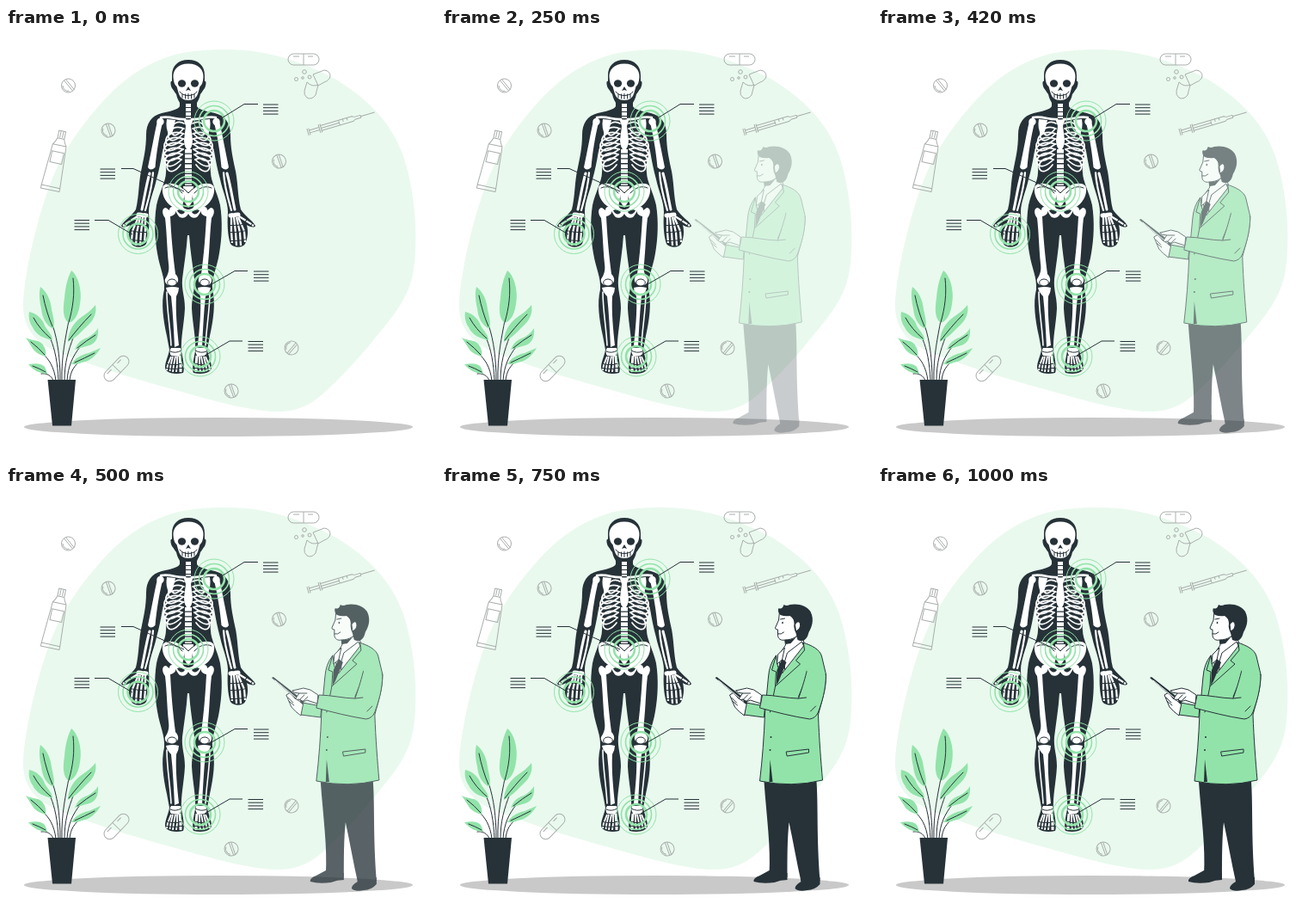
Animation of 500 by 500 pixels, one loop 1040 ms. Source, as an HTML page:

```html
<!DOCTYPE html>
<html lang="en">
<head>
<meta charset="utf-8">
<title>Skeleton check-up</title>
<style>
html, body { margin: 0; width: 100%; height: 100%; overflow: hidden; background: #fff; }
svg { display: block; width: 100vw; height: 100vh; }
.ink { fill: #263238; }
.line { fill: none; stroke: #263238; stroke-width: 1; stroke-linecap: round; stroke-linejoin: round; }
.bone { fill: #fff; }
.rod { fill: none; stroke: #fff; stroke-linecap: round; stroke-linejoin: round; }
.flat { stroke-linecap: butt; }
.leaf { fill: #92e3a9; }
.mint { fill: none; stroke: #92e3a9; }
.gray { fill: none; stroke: #a9aeac; stroke-width: 1; stroke-linejoin: round; }
.coat { fill: #92e3a9; stroke: #263238; stroke-width: 1; stroke-linejoin: round; }
.skin { fill: #fff; stroke: #263238; stroke-width: 1; stroke-linejoin: round; }
</style>
</head>
<body>
<svg viewBox="0 0 500 500">
<defs>
  <!-- left half of the figure, mirrored about x = 212 -->
  <g id="half">
    <path class="ink" d="M212 37C200 37 193 44 193 55V62C191 61 191 66 193 70C195 72 196 75 198 77C199 82 201 85 202 87V91C200 95 190 97 181 99C169 102 163 111 163 124C163 140 160 152 158 162C154 178 155 195 151 211C147 218 137 224 134 230C135 233 141 231 144 229C142 237 143 245 146 251C149 256 159 256 163 251C166 243 167 230 166 214C166 202 172 190 175 176C178 165 180 155 182 143C185 152 187 161 186 168C186 178 178 192 175 206C172 225 173 245 176 262C179 280 185 290 184 304C180 320 183 340 187 358L190 374C189 381 185 388 185 395C186 402 197 403 206 401C208 397 206 385 204 376C203 360 207 345 208 326C208 312 204 305 205 292C207 275 210 258 211 241H212Z"/>
    <path class="bone" d="M212 41.500C200 41.500 194 49 194.500 57C195 63 196 66 198.500 68L200.500 75C202 81 206 84 212 84Z"/>
    <path class="bone" d="M187 106L197 107L194 120L190 125Q185 117 187 106Z"/>
    <path class="rod" stroke-width="2.600" d="M208 106C199 107 192 102 180 104"/>
    <circle class="bone" cx="179.500" cy="109" r="4.200"/>
    <path class="bone" d="M176 108L182 110C178 126 175 145 173.500 162Q168 167 165 162C169 143 172 126 176 108Z"/>
    <path class="rod" stroke-width="3" d="M167 169C163 183 161 197 158 211"/>
    <path class="rod" stroke-width="2.200" d="M171 168C170 185 166 198 162 212"/>
    <path class="line" d="M164 166L173 167"/>
    <path class="rod" stroke-width="5" stroke-dasharray="3 .8" d="M154 217L163 218"/>
    <g class="rod flat" stroke-width="2.200" stroke-dasharray="9 1 7 1">
      <path d="M153 219L145 224L136 230"/>
      <path d="M154 220L147 236L146 249"/>
      <path d="M156 220L152 238L151 253"/>
      <path d="M159 220L157 238L156 253"/>
      <path d="M162 220L162 236L161 250"/>
    </g>
    <path class="bone" fill-rule="evenodd" d="M208 190C202 180 186 178 182.500 184C180 192 185 202 192 207C197 210 198 216 202 220C206 222 210 220 212 216V211C208 211 204 209 206 203ZM199 212C202 210 206 212 208 214C206 218 201 217 199 212Z"/>
    <path class="line" stroke-width=".8" d="M185 186C191 183 199 185 205 192"/>
    <path class="bone" d="M196 209C199 213 197 218 191 219C192 240 194 264 197 286C202 291 201 298 195 298C190 301 184 298 185 292C189 286 190 281 189 274C187 253 187 238 185 221C181 216 181 209 186 209L190 212C190 208 193 207 196 209Z"/>
    <ellipse cx="193" cy="296" rx="5.300" ry="4" class="skin"/>
    <path class="bone" d="M186 302Q194 300 201 302Q201 307 198 312C197 330 199 350 201 369L196 371C195 350 194 330 192 312Q187 307 186 302Z"/>
    <path class="rod" stroke-width="1.600" d="M187 307C187 328 191 348 192 369"/>
    <path class="bone" d="M192 372L203 372Q205 377 201 382L192 381Q189 376 192 372Z"/>
    <path class="line" d="M191 376Q197 379 204 375"/>
    <g class="rod flat" stroke-width="1.800" stroke-dasharray="9 1 4 1">
      <path d="M192 382L188 392L187 398"/>
      <path d="M194 382L191.500 392L190.500 399"/>
      <path d="M197 382L195 392L194 400"/>
      <path d="M199 382L199 392L198 400"/>
      <path stroke-width="3" d="M202 381L203 392L203 400"/>
    </g>
  </g>
  <g id="tablet">
    <circle class="gray" r="8"/>
    <path class="gray" d="M-5 -6L5 6M-3 -7.300L7 5M-6.500 0A6.500 6.500 0 0 0 1 6.400"/>
  </g>
  <g id="capsule" class="gray">
    <rect x="-18" y="-6.500" width="36" height="13" rx="6.500"/>
    <path d="M0 -6.500V6.500M-12 -3.500H-5M5 -3.500H11"/>
  </g>
</defs>

<path fill="#e9f9ee" d="M252 25C304 24 346 40 384 60C424 85 449 112 462 149C473 182 478 225 476 258C475 291 468 311 448 337C426 365 400 397 371 423C353 440 336 447 310 446C270 443 230 430 190 419C145 407 96 391 61 377C32 365 19 347 20 319C22 282 36 224 49 188C62 150 83 119 106 93C132 62 164 38 205 29Q229 25 252 25Z"/>
<ellipse cx="247" cy="464" rx="226" ry="11" fill="#c9c9c9"/>

<g id="tablets"></g>
<use href="#capsule" transform="translate(346 36.500)"/>
<use href="#capsule" transform="translate(128.500 396) rotate(-46)"/>
<g class="gray">
  <path d="M357 54L370 49Q377 50 377 56Q376 61 370 63L363 67Z"/>
  <path d="M350 63Q356 69 363 66L360 78Q355 84 350 81Q346 78 347 73Z"/>
  <circle cx="347" cy="51" r="2.300"/><circle cx="353" cy="57" r="2"/>
  <circle cx="337.500" cy="59.500" r="2"/><circle cx="345" cy="58" r="1.300"/>
  <g transform="translate(58 156) rotate(12)">
    <path d="M-8 -20L-11 29H11L8 -20Q5 -24 4 -28H-4Q-5 -24 -8 -20ZM-4 -28V-37H4V-28M-8 -20H8M-11 29V33H11V29M-7 -12H7V1H-7ZM-1.500 -37V-29M1.500 -37V-29"/>
  </g>
  <g transform="translate(351 121) rotate(-16.500)">
    <path d="M0 -4V4M2 -4V4M2 -1.500H14M2 1.500H14M14 -5V5M16 -5V5M16 -3H54L57 -1.500H64V1.500H57L54 3H16ZM64 0H81M16 0H38M38 -3V3M43 -3V0M48 -3V0"/>
  </g>
</g>

<g id="plant">
  <path class="line" d="M55 410C53 404 47 401 41 402M58 410C56 394 50 385 42 378M61 410C60 389 57 374 52 362M63 410C63 384 60 364 55 348M65 410C64 382 70 357 73 340M68 410C68 390 72 376 79 358M71 410C72 393 78 381 86 371M74 410C75 398 80 393 86 387"/>
  <g class="leaf">
    <path d="M76 282C84 288 89 306 86 321C84 335 79 341 73 343C66 338 66 327 68 314C69 302 71 292 76 282Z"/>
    <path d="M40 301C48 307 52 317 53 327C55 337 57 343 55 350C47 346 42 338 41 326C39 317 38 309 40 301Z"/>
    <path d="M27 330C36 332 43 339 45 346C49 353 54 357 54 363C44 361 35 357 31 348C27 342 26 336 27 330Z"/>
    <path d="M104 322C106 331 102 340 94 347C87 354 80 361 72 365C72 356 76 347 83 340C90 334 98 330 104 322Z"/>
    <path d="M107 349C108 360 104 367 97 369C91 371 85 372 80 374C83 366 88 362 95 360C100 357 104 354 107 349Z"/>
    <path d="M110 372C105 381 97 388 88 389C84 391 80 391 76 391C80 384 87 380 96 378Z"/>
    <path d="M23 360C30 364 37 362 42 367C46 372 47 377 46 382C39 380 33 377 30 371Z"/>
    <path d="M26 391C33 390 40 389 45 394Q47 398 48 402C39 402 32 398 26 391Z"/>
  </g>
  <path class="line" stroke-width=".7" d="M78 291C80 309 78 325 73 342M43 311Q47 331 54 347M32 337Q39 350 52 361M99 333C89 343 80 354 73 363M104 357Q94 363 83 372M103 378Q91 384 80 389M29 365Q38 372 45 380M31 393Q39 396 46 400"/>
  <path class="ink" d="M48.500 409H81L76 462.500H54Z"/>
</g>

<g id="skeleton">
  <use href="#half"/>
  <use href="#half" transform="matrix(-1 0 0 1 424 0)"/>
  <path class="rod flat" stroke-width="6" stroke-dasharray="4 1" d="M212 88V105"/>
  <path class="rod flat" stroke-width="8" stroke-dasharray="4.500 1.300" d="M212 141V183"/>
  <g id="ribs" class="rod" stroke-width="1.700"></g>
  <path class="bone" d="M206 105Q212 108 218 105L215 114L217 130Q217 139 212 143Q207 139 207 130L209 114Z"/>
  <path class="bone" d="M206 184H218L216 203L212 209L208 203Z"/>
  <path class="line" d="M207 187L212 192L217 187"/>
  <ellipse class="ink" cx="204.500" cy="64.500" rx="4.600" ry="4.200"/>
  <ellipse class="ink" cx="219.500" cy="64.500" rx="4.600" ry="4.200"/>
  <path class="ink" d="M212 68L215 73L212 72L209 73Z"/>
  <path class="line" d="M202 74Q205 78.500 212 78.500Q219 78.500 222 74"/>
  <path class="line" stroke-width=".7" d="M205 77V81M208.500 77V82M212 76.500V82.500M215.500 77V82M219 77V81"/>
</g>
<g id="rings" class="mint"></g>
<g id="notes" class="line flat"></g>

<g id="doctor">
  <path class="ink" d="M373 344L434 344C436 374 434 407 438 459L416 460C411 438 407 414 402 391C400 410 400 432 400 455L379 452C381 420 376 386 373 344Z"/>
  <path class="ink" d="M379 447L400 450V458Q392 458 385 461Q371 463 361 460Q360 456 368 453Z"/>
  <path class="ink" d="M416 455L438 455V463Q432 470 423 470Q413 472 409 468Q409 464 416 460Z"/>

  <path class="skin" d="M397 177L398 185L389 198L393 215L421 187L417 174Z"/>
  <path class="coat" d="M352 252L374 256L373 269L350 266Z"/>
  <path class="coat" d="M418 182C428 185 438 190 440 198L445 219C445 237 440 250 436 266C437 294 439 319 441 342Q405 351 368 343C371 318 373 291 374 264L378 222Q379 207 387 197L389 210L394 218L413 190Z"/>
  <path class="skin" d="M389 196L397 188L394 202L388 207ZM397 204L400 194L417 181L419 186L397 214Z"/>
  <path class="ink" d="M394 201L399 205L397 210L390 227L387 232L388 214L391 207Z"/>
  <path class="line" d="M387 197L382 214L387 216L386 233L415 207L410 203L420 191L419 183M386 233L380 263M399 309L425 306V310L400 314ZM423 221L413 245"/>
  <path class="ink" d="M380 318L383 344L379 344Z"/>
  <circle class="ink" cx="381" cy="292" r="1"/><circle class="ink" cx="380" cy="307" r="1"/>
  <path class="coat" d="M371 243C385 243 400 247 413 247C418 233 421 222 423 214L445 219C445 237 440 252 436 263Q433 270 426 271C406 268 387 263 368 258Z"/>
  <path fill="none" stroke="#92e3a9" stroke-width="2.500" d="M422.500 214L444 218.500"/>
  <path class="line" d="M413 247L422 246M427 262L433 256"/>

  <path class="skin" d="M333 243L338 240L343 247L353 252L350 267Q343 262 339 257Z"/>
  <path class="ink" d="M316 223L318 222L354 250L352 254Z"/>
  <path class="line" stroke-width=".6" style="stroke:#fff" d="M320 226L349 250"/>
  <path class="skin" d="M370 243L361 237L353 235L340 238Q342 241 348 241L344 247Q345 250 348 248L352 250Q354 251 357 249L369 253Z"/>
  <path class="line" d="M348 241L357 241M349 248L354 243M353 250L358 245M335 246L341 252M336 250L342 255"/>

  <path class="skin" d="M391 146L390 156L386 165Q386 167 389 167L389 173C389 178 393 180 397 179C407 179 414 174 416 167L417 150Z"/>
  <path class="ink" d="M392 150Q388 146 390 142Q394 144 396 138Q399 140 403 138C412 136 423 139 427 146C432 156 428 165 425 170C423 179 418 182 412 179L410 171Q407 165 408 160Q408 154 403 151Q397 152 392 150Z"/>
  <path class="skin" d="M409 161Q413 155 415 160Q416 166 410 169Z"/>
  <path class="ink" d="M397 179Q407 179 411 175L404 183L398 184Z"/>
  <path class="line" d="M392 155L397 154M389 172Q393 173 396 170"/>
  <ellipse class="ink" cx="394.500" cy="159" rx=".8" ry="1.300"/>
</g>
</svg>

<script>
const $ = id => document.getElementById(id);

$('tablets').innerHTML = [[72.5, 67, 0], [119, 119, 20], [317.5, 155, 20], [332, 372, 80], [262, 422, 20]]
  .map(([x, y, turn]) => `<use href="#tablet" transform="translate(${x} ${y}) rotate(${turn})"/>`).join('');

// each rib loops from the breastbone out to the side and back to the spine
let ribs = '';
for (let i = 0; i < 8; i++) {
  const y = 111 + i * 6, w = 16 + 13 * Math.sin((i + 1) * 0.3), gap = i > 4 ? i + 1 : 5;
  for (const side of [-1, 1]) {
    const x = k => 212 + side * k;
    ribs += `<path d="M${x(gap)} ${y}C${x(w * .6)} ${y - 4} ${x(w)} ${y} ${x(w)} ${y + 9}` +
      `C${x(w - 2)} ${y + 17} ${x(w * .6)} ${y + 14} ${x(gap + 1)} ${y + 6}"/>`;
  }
}
$('ribs').innerHTML = ribs;

$('rings').innerHTML = [[242, 108], [212, 190], [153.5, 239.5], [231, 298], [226, 382]]
  .map(([x, y]) => [[23, 1], [17.5, 1.6], [12, 2.6]]
    .map(([r, w]) => `<circle cx="${x}" cy="${y}" r="${r}" stroke-width="${w}"/>`).join('')).join('');

const notes = [
  [299, 89, 'M252 104L277 88.500H293'],
  [109.5, 164, 'M134 163.500H148L207 190'],
  [79.5, 223.5, 'M103 223.500H119L147 240'],
  [288, 283, 'M281 282.500H266L239 298'],
  [281.5, 364.5, 'M275 364H260L231 381']
];
$('notes').innerHTML = notes.map(([x, y, path]) =>
  `<path d="${path}"/>` + [0, 1, 2, 3].map(i => `<path d="M${x} ${y + i * 3.7}h17.500"/>`).join('')).join('');

const bezier = (a, b, t) => 3 * a * t * (1 - t) ** 2 + 3 * b * t * t * (1 - t) + t ** 3;

function ease(x) {
  let lo = 0, hi = 1;
  for (let i = 0; i < 24; i++) {
    const mid = (lo + hi) / 2;
    if (bezier(.36, .5, mid) < x) lo = mid; else hi = mid;
  }
  return bezier(-.01, 1.38, hi);
}

const LOOP = 1040, STEP = LOOP / 25;
const start = performance.now();

function draw() {
  const t = (performance.now() - start) % LOOP;
  const step = Math.min(24, Math.floor((t + 4) / STEP));
  const p = step < 2 ? 0 : ease(Math.min(1, (step * STEP + 10) / 1000));
  $('doctor').setAttribute('transform', `translate(${30 * (p - 1)} 0)`);
  $('doctor').setAttribute('opacity', Math.max(0, Math.min(1, p)));
  requestAnimationFrame(draw);
}
draw();
</script>
</body>
</html>
```
